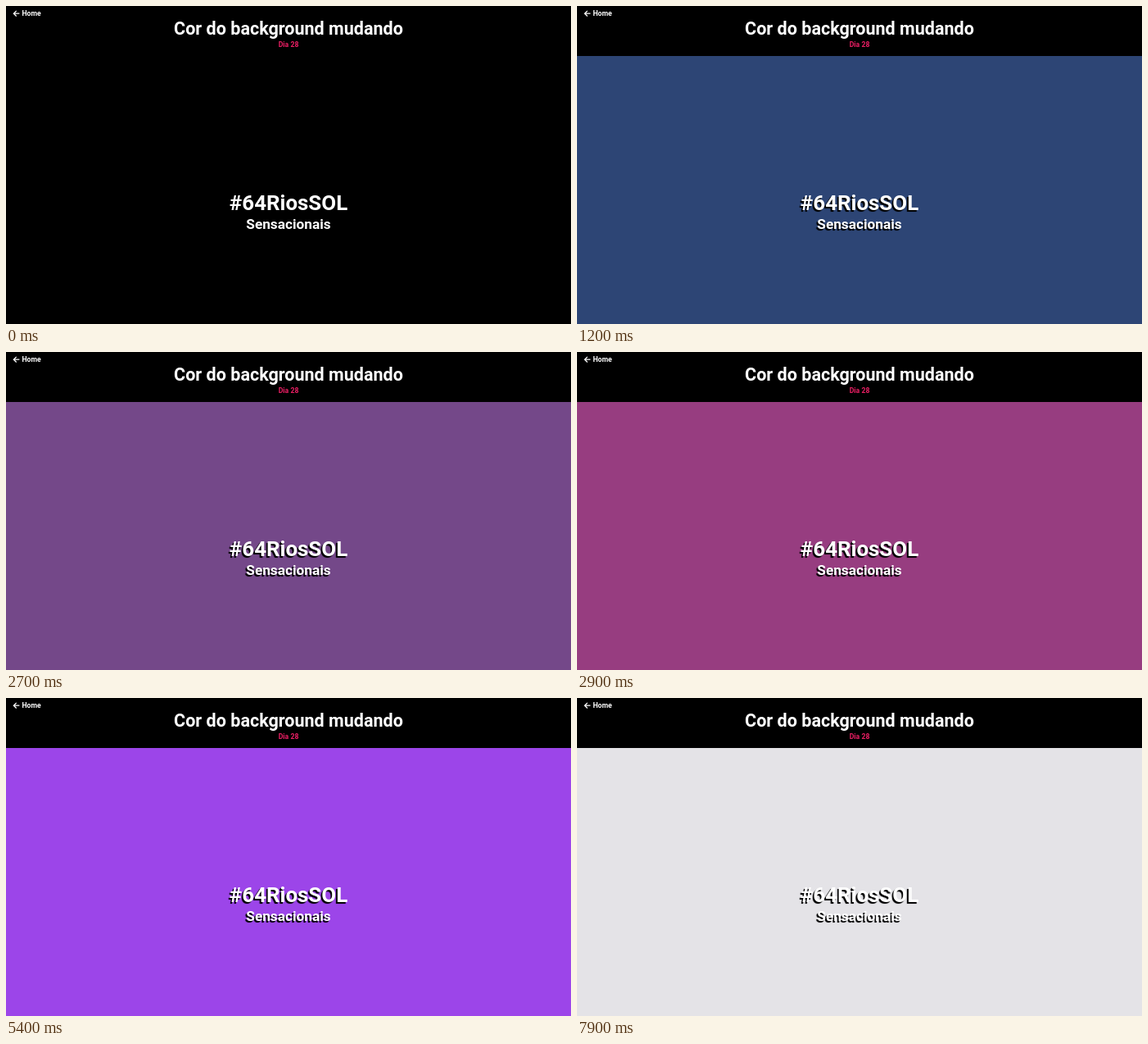
These frames come from a looping animation (690x388 px, 8000 ms). An HTML page:

```html
<!DOCTYPE html>
<html lang="pt-BR">
<head>
<meta charset="utf-8">
<title>Cor do background mudando</title>
<style>
  html, body { margin: 0; width: 100%; height: 100%; overflow: hidden; background: #000; }
  svg { display: block; width: 100%; height: 100%; }
  text { font-family: Roboto, sans-serif; font-weight: 700; fill: #fff; }
  .mid { text-anchor: middle; }
  .title { font-size: 21.56px; }
  .small { font-size: 8.7px; }
  .day { fill: #e91e63; }
  .tag { font-size: 25.9px; }
  .sub { font-size: 17.25px; }
  .shadow { text-shadow: -1.8px 1.8px .7px #000; }
</style>
</head>
<body>
<svg viewBox="0 0 690 388">
  <rect width="690" height="388"/>
  <rect id="panel" y="61" width="690" height="327"/>
  <path d="M16.4 9.2H9.6M12.7 5.9L9.4 9.2L12.7 12.5" fill="none" stroke="#fff" stroke-width="1.3"/>
  <text class="small" x="19.4" y="12.4">Home</text>
  <text class="mid title" x="345" y="35">Cor do background mudando</text>
  <text class="mid small day" x="345" y="50">Dia 28</text>
  <text class="mid tag shadow" x="345" y="249.3">#64RiosSOL</text>
  <text class="mid sub shadow" x="345" y="272">Sensacionais</text>
</svg>
<script>
  const LOOP = 8000, STEP = 100, START = 260, SPAN = 2000;
  const colors = [[0, 0, 0], [59, 89, 152], [225, 38, 109], [145, 74, 253], [230, 230, 231]];
  const panel = document.getElementById('panel');

  const bezier = (a, b, u) => 3 * a * u * (1 - u) ** 2 + 3 * b * u * u * (1 - u) + u ** 3;

  // CSS "ease": cubic-bezier(.25, .1, .25, 1)
  function ease(x) {
    let lo = 0, hi = 1;
    for (let i = 0; i < 24; i++) {
      const u = (lo + hi) / 2;
      if (bezier(.25, .25, u) < x) lo = u; else hi = u;
    }
    return bezier(.1, 1, (lo + hi) / 2);
  }

  function render(t) {
    const pos = Math.max(0, (t - START) / SPAN);
    const i = Math.min(Math.floor(pos), colors.length - 2);
    const k = ease(Math.min(pos - i, 1));
    const rgb = colors[i].map((c, n) => Math.round(c + (colors[i + 1][n] - c) * k));
    panel.setAttribute('fill', `rgb(${rgb})`);
  }

  const origin = performance.now();
  function tick() {
    const t = (performance.now() - origin) % LOOP;
    render(Math.floor(t / STEP) * STEP);
    requestAnimationFrame(tick);
  }
  tick();
</script>
</body>
</html>
```
